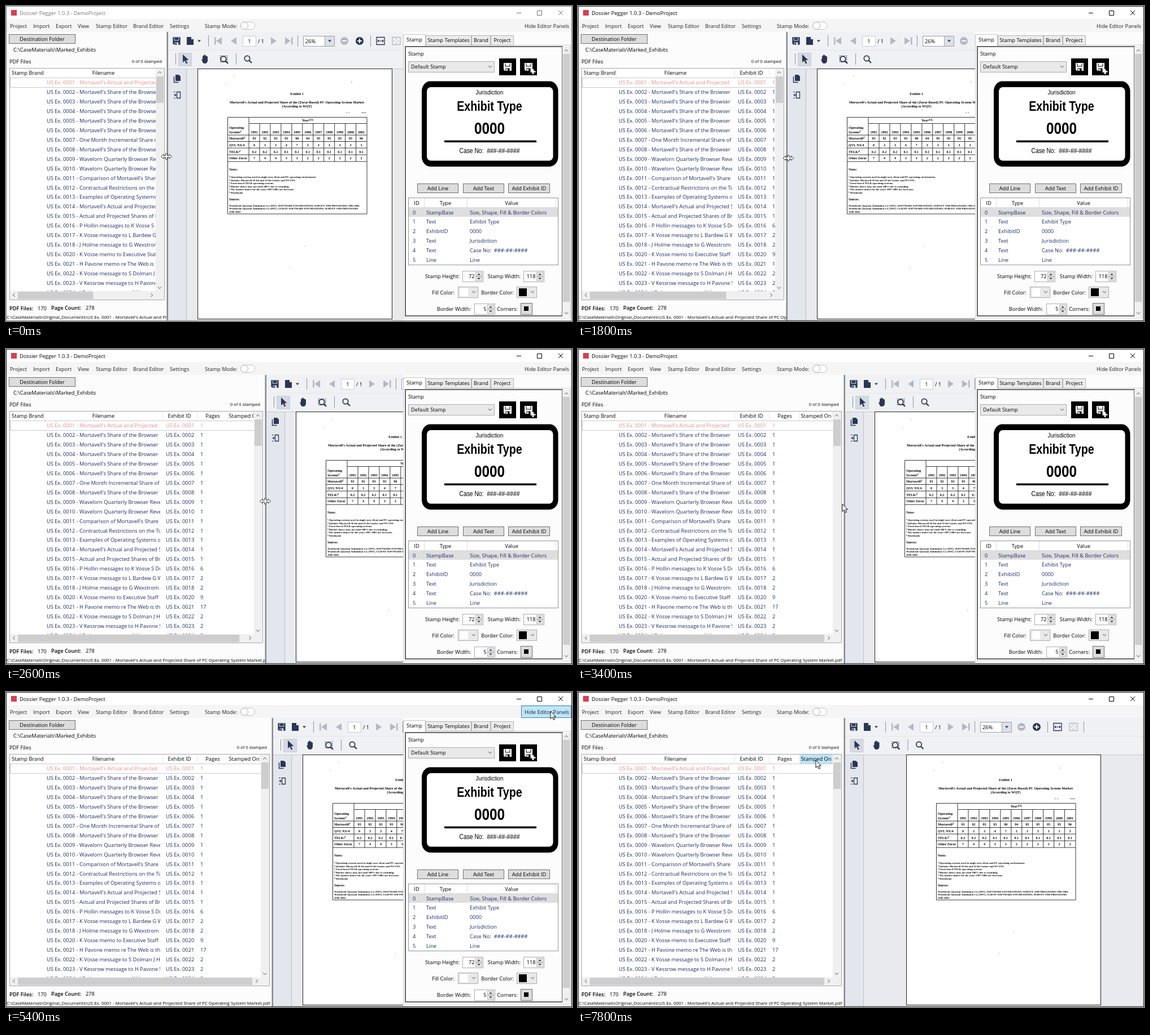
An HTML page for the animation above (8 s loop, 1002 by 559 pixels).

```html
<!DOCTYPE html>
<html>
<head>
<meta charset="utf-8">
<style>
html, body { margin: 0; width: 100%; height: 100%; overflow: hidden; background: #fff; }
svg { display: block; width: 1002px; height: 559px; font-family: "Open Sans", "Noto Sans", sans-serif; font-size: 9.25px; }
text { white-space: pre; }
.doc { font-family: "Liberation Serif", serif; font-weight: bold; font-size: 6px; }
.stamp { font-family: "Liberation Sans", sans-serif; text-anchor: middle; }
</style>
</head>
<body>
<svg id="stage" viewBox="0 0 1002 559"></svg>
<script>
const NAVY = '#1d2c66', ICON = '#2b3654', OFF = '#b3b8c2', EDGE = '#a5a8ae';
const esc = s => String(s).replace(/&/g, '&amp;').replace(/</g, '&lt;');
const text = (x, y, s, o = '') => `<text x="${x}" y="${y}" ${o}>${esc(s)}</text>`;
const mid = 'text-anchor="middle"', end = 'text-anchor="end"';
const rect = (x, y, w, h, fill, o = '') => `<rect x="${x}" y="${y}" width="${w}" height="${h}" fill="${fill}" ${o}/>`;
const box = (x, y, w, h, fill, line) => rect(x + .5, y + .5, w, h, fill, `stroke="${line}"`);
const line = (d, color, w = 1, o = '') => `<path d="${d}" fill="none" stroke="${color}" stroke-width="${w}" ${o}/>`;
const shape = (d, fill, o = '') => `<path d="${d}" fill="${fill}" ${o}/>`;
const group = (id, body, o = '') => `<g id="${id}" ${o}>${body}</g>`;
const button = (x, y, w, h, s) => box(x, y, w, h, '#ddd', '#707070') + text(x + w / 2 + .5, y + h / 2 + 4, s, mid);
const chevron = (x, y, dx, dy, c = '#555') => dx
  ? line(`M${x - dx} ${y - 3}L${x + dx} ${y}L${x - dx} ${y + 3}`, c)
  : line(`M${x - 3} ${y - dy}L${x} ${y + dy}L${x + 3} ${y - dy}`, c);

// ---- title and menu
const frame = () => {
  const menu = [[7, 'Project'], [48, 'Import'], [88, 'Export'], [127, 'View'], [159, 'Stamp Editor'],
    [225, 'Brand Editor'], [290, 'Settings'], [352, 'Stamp Mode:']];
  return rect(0, 0, 1002, 23, '#fff') + rect(0, 23, 1002, 23, '#f5f5f5')
    + rect(9, 7, 10, 10, '#d8404f')
    + group('title', text(24, 15.5, 'Dossier Pegger 1.0.3 - DemoProject', 'fill="currentColor"')
      + line('M904 12.5h8M940.5 8.5h8v8h-8zM978 8l8 8m0-8l-8 8', 'currentColor'))
    + menu.map(([x, s]) => text(x, 39, s, 'fill="#222"')).join('')
    + rect(415.5, 28.5, 25, 13, '#fff', 'rx="6.5" stroke="#c4c4c4"')
    + '<circle cx="422" cy="35" r="6.5" fill="#fff" stroke="#b4b4b4"/>'
    + group('hide', rect(912.5, 24.5, 88, 21, '#bee6fd', 'id="hot" stroke="#3c7fb1"')
      + text(918, 39, 'Hide Editor Panels', 'fill="#222"'));
};

// ---- file list
const MV = 'Mortavell';
const files = [
  `${MV}'s Actual and Projected`, ...Array(5).fill(`${MV}'s Share of the Browser`),
  'One Month Incremental Share of', `${MV}'s Share of the Browser`,
  'Wavelorn Quarterly Browser Revenue', 'Wavelorn Quarterly Browser Revenue',
  `Comparison of ${MV}'s Share`, 'Contractual Restrictions on the Top', 'Examples of Operating Systems of',
  `${MV}'s Actual and Projected S`, 'Actual and Projected Shares of Browsers',
  'P Hollin messages to K Vosse S Dolman', 'K Vosse message to L Bardew G Wex', 'J Holme message to G Wexstrom',
  'K Vosse memo to Executive Staff and', 'H Pavone memo re The Web is the', 'K Vosse message to S Dolman J Ho',
  'V Kessrow message to H Pavone S', 'J Dolman message to K Vosse'];
const pages = i => i < 15 ? 1 : [6, 2, 2, 9, 17, 2, 2, 3][i - 15];
const rowText = (x, f) => files.map((s, i) => {
  const id = 'US Ex. ' + String(i + (i > 17 ? 2 : 1)).padStart(4, '0');
  return text(x, (139.3 + i * 16.93).toFixed(2), f(id, s, i), `fill="${i ? NAVY : '#ea8c8c'}"`);
}).join('');

const left = () => rect(0, 46, 1002, 513, '#fcfcfc')
  + button(5, 50, 117, 16, 'Destination Folder')
  + text(13, 81, 'C:\\CaseMaterials\\Marked_Exhibits') + text(6, 102, 'PDF Files')
  + box(6, 110, 700, 411, '#fff', EDGE)
  + rowText(72, (id, s) => id + ' - ' + s)
  + rect(273, 111, 300, 395, '#fff')
  + rowText(283, id => id) + rowText(344, (id, s, i) => pages(i))
  + line('M7.5 127.5H700M7.5 144.5H700M7.5 127V144', '#c9c9c9')
  + rect(393, 111, 57, 16, '#bce5fc', 'id="sorted"')
  + line('M39.5 112v14M67.5 112v14M277.5 112v14M338.5 112v14M392.5 112v14M450.5 112v14', '#e6e6e6')
  + [[24, 'Stamp'], [53.5, 'Brand'], [172.5, 'Filename'], [307, 'Exhibit ID'], [366, 'Pages'], [421.5, 'Stamped On']]
    .map(([x, s]) => text(x, 122, s, mid)).join('')
  + rect(7, 506, 693, 15, '#f0f0f0') + rect(21, 507, 134, 13, '#cdcdcd', 'id="thumb"')
  + chevron(14, 513, -1.7, 0)
  + text(6, 540, 'PDF Files:', 'font-weight="600"') + text(56, 540, 170)
  + text(80, 539, 'Page Count:', 'font-weight="600"') + text(141, 539, 278)
  + text(1, 555, `C:\\CaseMaterials\\Original_Documents\\US Ex. 0001 - ${MV}'s Actual and Projected Share of PC Operating System Market.pdf`, 'font-size="7.95"');

// ---- viewer
const floppy = (x, y, s, a, b) => `<g transform="translate(${x} ${y}) scale(${s})">`
  + shape('M-7-7H7V7H-5L-7 5Z', a) + shape('M-4.500-6H4.500V-.5H-4.500ZM-3.500 2.500H3.500V7H-3.500Z', b)
  + shape('M-3.500-6H3.500V-1.500H-3.500ZM-2.500 3.500H0V7H-2.500Z', a) + '</g>';
const sep = (x, y) => line(`M${x}.5 ${y - 10}v20`, '#8d929c');
const tri = (x, y, dir, bar) => shape(`M${x - 5 * dir} ${y - 6.5}L${x + 5 * dir} ${y}L${x - 5 * dir} ${y + 6.5}Z`, OFF)
  + (bar ? rect(x + 7 * dir - 1, y - 6.5, 2.5, 13, OFF) : '');
const drop = (x, y) => shape(`M${x - 3} ${y - 1.5}h6l-3 3.5z`, ICON);
const round = (x, c, plus) => `<circle cx="${x}" cy="62" r="7" fill="${c}"/>`
  + line(`M${x - 4} 62h8` + (plus ? `M${x} 58v8` : ''), '#fff', 2);
const fit = (x, c, d) => line(`M${x - 7} 55.5h14v13h-14z`, c, 1.3) + line(d, c, 1.2);
const lens = (x, y) => `<circle cx="${x}" cy="${y}" r="4.7" fill="none" stroke="${ICON}" stroke-width="1.7"/>`
  + line(`M${x + 3.5} ${y + 3.5}l4.5 4.5`, ICON, 2.2);

const toolbar = () => rect(287, 46, 720, 65, '#f0f1f4') + line('M287 78.5h720', '#e2e5ea') + line('M287 111.5h720', '#c3c8d0')
  + floppy(302, 62, .95, ICON, '#dfe4ee')
  + shape('M320 55h8l4 4v10h-12z', ICON) + shape('M328 55v4h4z', '#fff') + drop(342, 62)
  + sep(358, 62) + tri(377, 62, -1, 1) + tri(403, 62, -1)
  + box(419, 53, 23, 18, '#fff', '#c7cbd3') + text(431, 66, 1, mid) + text(446, 66, '/ 1')
  + tri(474, 62, 1) + tri(499, 62, 1, 1) + sep(516, 62)
  + box(526, 53, 55, 18, '#fff', '#9a9fa9') + rect(564, 54, 17, 17, '#dce0e7') + line('M564.5 54v17', '#a4a9b3')
  + drop(573, 62) + text(530, 66, '26%') + round(599, OFF) + round(626, ICON, 1) + sep(645, 62)
  + fit(663, ICON, 'M658 62h10m-8-2l-2 2l2 2m6-4l2 2l-2 2')
  + fit(691, OFF, 'M691 57v3m0 4v3M686 62h3m4 0h3') + sep(709, 62)
  + group('rowSep', sep(300, 94))
  + group('row2', box(305, 83, 23, 23, '#d5d9e2', '#c9ced8')
    + shape('M313 86v14l3.4-3l2.6 5.5l2.3-1l-2.6-5.3l4.5-.4z', ICON)
    + shape('M346 94l2 1V89q1-1.5 2 0V87q1.2-1.5 2.3 0v1q1.2-1 2.3.3v1.2q1.3-1 2.4.5V97q-.5 5-5 5h-1.5q-2.5-.6-4.5-8z', ICON)
    + line('M379.5 88.5h12v11h-12z', ICON, 1.2, 'stroke-dasharray="2 1.5"') + lens(385, 94)
    + sep(407, 94) + lens(427, 93));

const paper = () => {
  const years = [...Array(11).keys()].map(i => 1991 + i);
  const x = i => 439.5 + i * 18.95;
  const rows = [
    [MV + '²⁾', [93, 92, 93, 93, 90, 94, 95, 95, 95, 95, 96]],
    ['QVL NX/4', [0, 3, 3, 4, 7, 3, 3, 3, 3, 3, 3]],
    ['TELK³⁾', years.map(y => y < 1994 ? '0.2' : '0.1')],
    ['Other Zorat', [7, 4, 4, 3, 3, 2, 2, 2, 2, 2, 2]]];
  const notes = ['Operating systems used in single-user client and PC operating environment.',
    `Includes ${MV} 16-bit and 32-bit Lattice and NV-SYS.`, 'Zorat-based TELK operating systems.',
    'Market shares may not total 100% due to rounding.', 'The market shares for the years 1997-2001 are forecasts.', 'Worldwide'];
  const org = 'Worldwide Quorum Tabulation Co (1997), ';
  const small = 'font-size="4.7"';
  return box(339, 111, 344, 444, '#fff', '#222')
    + text(515, 158, 'Exhibit 1', mid)
    + text(515, 173, `${MV}'s Actual and Projected Share of the (Zorat-Based) PC Operating System Market`, mid + ' font-size="6.15"')
    + text(515, 180, '(According to WQT)', mid)
    + line('M392.5 197.5H639V369H392.5zM430.5 208.5H639M392.5 229H639M392.5 240.5H639M392.5 252H639M392.5 264H639M392.5 276H639M430 197V276'
      + years.slice(1).map((y, i) => `M${x(i) + 9.5} 208.5V276`).join(''), '#222', .9)
    + text(534, 205, 'Year⁴⁾⁵⁾⁶', mid) + text(395, 218, 'Operating') + text(395, 225.5, 'System¹⁾')
    + years.map((y, i) => text(x(i), 225.5, y, mid)).join('')
    + rows.map(([name, v], r) => {
      const y = 237 + r * 11.8;
      return text(395, y, name) + v.map((n, i) => text(x(i), y, n, mid)).join('');
    }).join('')
    + text(395, 292, 'Notes:', 'font-size="5.5"')
    + notes.map((s, i) => text(395, 305 + i * 5.6, '¹²³⁴⁵⁶'[i] + ' ' + s, small)).join('')
    + text(395, 345, 'Sources:', 'font-size="5.2"')
    + text(395, 355.5, org + 'SOFTWARE FOUNDATIONS, SURVEY AND PROGNOSIS 1996-2001.', small)
    + text(395, 361, org + 'CLIENT SOFTWARE FOUNDATIONS, SURVEY AND PROGNOSIS', small)
    + text(395, 367, '1996-2001', small)
    + line('M388 139h1M403 125h1M611 135h1.5M529 426h1M503 464h1M602 189.5h2m2 0h2M629 189.5h9', '#555', .8);
};

const viewer = () => rect(265, 111, 15, 395, '#f0f0f0') + rect(266, 125, 13, 47, '#cdcdcd')
  + chevron(272, 118, 0, -1.7) + chevron(272, 500, 0, 1.7)
  + rect(251, 506, 29, 15, '#f0f0f0') + chevron(258, 513, 1.7, 0)
  + rect(280, 109, 6, 414, '#fcfcfc') + line('M280.5 110V521', EDGE)
  + text(276, 101, '0 of 0 stamped', end + ' font-size="7.65"')
  + rect(286, 46, 720, 513, '#e9eaed') + toolbar()
  + rect(287, 112, 32, 447, '#e3e6ec') + line('M319.5 112V559', '#b9c0cc')
  + shape('M300 122h6l3 3v8h-9z', ICON) + line('M297.5 125v10.5h8', ICON, 1.5)
  + line('M302.5 152.5h6v11h-6z', ICON, 1.3) + line('M297 152.5h3M297 163.5h3M297 158h4m-2-2l2 2l-2 2', ICON, 1.2)
  + group('page', paper(), 'class="doc"')
  + rect(284.5, 46, 2.5, 513, '#85888d');

// ---- editor panel
const combo = (x, y, w, h, fill) => box(x, y, w, h, '#e9e9e9', '#acacac') + chevron(x + w - 7, y + h / 2, 0, 1.7)
  + (fill ? box(x + 4, y + 3, 13, 13, fill, fill) : '');
const spinner = (x, y, v) => box(x, y, 36, 19, '#fff', '#abadb3') + text(x + 21.5, y + 13, v, end)
  + [2, 10].map((dy, i) => box(x + 23, y + dy, 11, 7, '#e8e8e8', '#bbb')
    + shape(`M${x + 26} ${y + dy + (i ? 2.5 : 5.5)}h6l-3 ${i ? 3 : -3}z`, '#444')).join('');
const saver = x => rect(x - 1, 93, 30, 30, '#000') + floppy(x + 14, 108, 1, '#fff', '#000');
const stretched = (y, s, size, o = '') => `<g transform="translate(856 ${y}) scale(1 1.18)">${text(0, 0, s, `font-size="${size}" ` + o)}</g>`;

const editor = () => {
  const tabs = [[743, 80, 'Stamp Templates'], [824, 33, 'Brand'], [858, 40, 'Project']];
  const rows = [['StampBase', 'Size, Shape, Fill & Border Colors'], ['Text', 'Exhibit Type'], ['ExhibitID', '0000'],
    ['Text', 'Jurisdiction'], ['Text', 'Case No:  ###-##-####'], ['Line', 'Line']];
  const navy = `fill="${NAVY}"`;
  return rect(703, 46, 298, 512, '#fcfcfc') + box(703, 69, 296, 484, '#fff', '#cfcfcf')
    + tabs.map(([x, w, s]) => box(x, 52, w, 17, '#ececec', '#b4b4b4') + text(x + w / 2 + .5, 64, s, mid)).join('')
    + box(703, 50, 39, 20, '#fff', '#c4c4c4') + rect(704, 69, 38, 3, '#fff') + text(723, 63, 'Stamp', mid)
    + rect(707, 72, 278, 478, '#fcfcfc', 'stroke="#666" stroke-width="2"')
    + rect(985, 72, 14, 479, '#f0f0f0') + rect(986, 85, 12, 440, '#cdcdcd')
    + chevron(992, 79, 0, -1.7) + chevron(992, 545, 0, 1.7)
    + text(712, 88, 'Stamp') + combo(712, 98, 152, 19) + text(717, 111, 'Default Stamp')
    + saver(874) + saver(911) + line('M933 112v9m-4.5-4.5h9', '#fff', 2.5)
    + rect(736, 133.5, 241.5, 151.5, '#000', 'rx="15" ry="17.5"') + rect(745, 144, 223.5, 130.5, '#fff', 'rx="7" ry="8"')
    + `<g class="stamp">${stretched(156.5, 'Jurisdiction', 9.8)}${stretched(185.5, 'Exhibit Type', 19.7, 'font-weight="bold"')}`
    + `${stretched(226.5, '0000', 24.3, 'font-weight="bold"')}${stretched(261, 'Case No:  ###-##-####', 10.3)}</g>`
    + rect(776, 238.5, 163, 3.5, '#000')
    + button(728, 315, 72, 16, 'Add Line') + button(809, 315, 72, 16, 'Add Text') + button(889, 315, 73, 16, 'Add Exhibit ID')
    + box(712, 340, 265, 119, '#fff', '#969696') + rect(713, 357, 264, 17, '#dedede')
    + line('M740.5 341v16M816.5 341v16M973.5 341v16', '#ddd')
    + text(727, 353, 'ID', mid) + text(778, 353, 'Type', mid) + text(895, 353, 'Value', mid)
    + rows.map(([a, b], i) => {
      const y = 369.5 + i * 16.9;
      return text(720, y, i, navy) + text(744, y, a, navy) + text(821, y, b, navy);
    }).join('')
    + text(803, 483, 'Stamp Height:', end) + spinner(808, 470, 72)
    + text(911, 483, 'Stamp Width:', end) + spinner(916, 470, 118)
    + text(794, 512, 'Fill Color:', end) + combo(800, 498, 35, 19, '#fff')
    + text(899, 512, 'Border Color:', end) + combo(904, 498, 35, 19, '#000')
    + text(823, 541, 'Border Width:', end) + spinner(829, 528, 5)
    + text(906, 541, 'Corners:', end) + box(911, 527, 20, 20, '#ddd', '#707070') + rect(917, 533, 8, 8, '#000');
};

const cursors = () => group('sizer', shape('M-9.5 0L-5-4V-1.5H-1.5V-5H1.5V-1.5H5V-4L9.5 0L5 4V1.5H1.5V5H-1.5V1.5H-5V4Z', '#fff', 'stroke="#222" stroke-width=".9"'))
  + group('arrow', shape('M0 0V13.5L3.2 10.6L5.4 15.5L7.6 14.5L5.4 9.8H9.6Z', '#fff', 'stroke="#111"'));

const $ = id => document.getElementById(id);
$('stage').innerHTML = left() + group('viewer', viewer()) + group('editor', editor()) + frame()
  + rect(.5, .5, 1001, 558, 'none', 'id="border" stroke-width="1.5"') + cursors();

// ---- motion: keys are [time, values...]
const drag = [[1000, 0], [1400, 25], [1800, 84], [2200, 136], [2600, 174], [3000, 186]];
const sizerPath = [[1000, 284, 267], [1400, 312.5, 267], [1800, 372.5, 270], [2600, 459, 270], [3000, 472, 272]];
const arrowPath = [[3400, 468, 275], [5200, 963, 35], [5400, 964, 34], [6400, 964, 34], [7600, 420, 120], [7800, 421, 121]];
const smooth = p => (1 - Math.cos(Math.PI * p)) / 2;
function at(keys, t, ease = p => p) {
  if (t <= keys[0][0]) return keys[0].slice(1);
  const i = keys.findIndex(k => k[0] >= t);
  if (i < 0) return keys[keys.length - 1].slice(1);
  const a = keys[i - 1], b = keys[i], p = ease((t - a[0]) / (b[0] - a[0]));
  return a.slice(1).map((v, j) => v + (b[j + 1] - v) * p);
}
const move = (id, x, y = 0) => $(id).setAttribute('transform', `translate(${x} ${y})`);
const show = (id, on) => $(id).style.display = on ? '' : 'none';

function draw(now) {
  const t = Math.floor(now % 8000 / 200) * 200;
  const d = Math.round(at(drag, t)[0]), active = t >= 1000, sizing = t < 3400, hidden = t >= 6200;
  const [x, y] = sizing ? at(sizerPath, t) : at(arrowPath, t, smooth);
  $('title').style.color = active ? '#000' : '#777';
  $('border').setAttribute('stroke', active ? '#4a4a4a' : '#999');
  move('viewer', d);
  $('thumb').setAttribute('width', (259 + d) / 446 * (230 + d));
  move('page', hidden ? 56 : 0);
  move('row2', hidden ? -9.5 : 0);
  show('rowSep', !hidden);
  show('editor', !hidden);
  show('hide', !hidden);
  show('hot', !sizing && x > 912 && y < 46);
  show('sorted', !sizing && x > 393 && x < 450 && y > 111 && y < 127);
  show('sizer', sizing);
  show('arrow', !sizing);
  move(sizing ? 'sizer' : 'arrow', x, y);
}
const start = performance.now();
function tick() {
  draw(performance.now() - start);
  requestAnimationFrame(tick);
}
tick();
</script>
</body>
</html>
```
